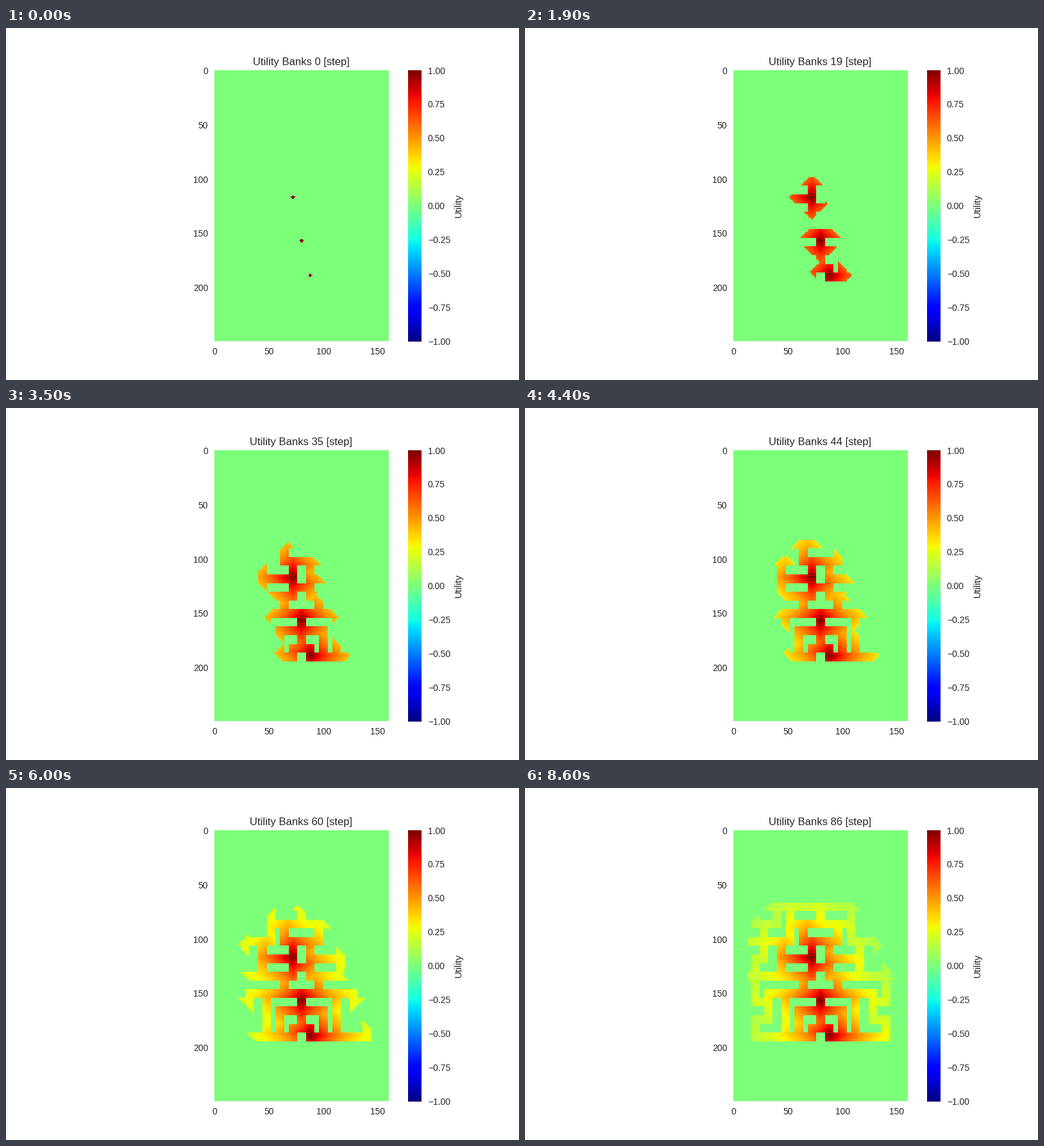
Recreate the animation shown at these times as a matplotlib script. Size 800 px wide and 550 px high, loop 8.7 s.

```python
import numpy as np
import matplotlib.pyplot as plt
from matplotlib.animation import FuncAnimation

W, H = 160, 250
LANE = 8          # corridor width in cells
TOP = 67          # first row of the maze
STEPS = 87
DECAY = 0.976
INK = "0.15"

plt.rcParams.update({
    "font.family": "Liberation Sans",
    "font.size": 10,
    "text.color": INK,
    "text.kerning_factor": 6,
    "axes.labelcolor": INK,
    "axes.facecolor": "#EAEAF2",
    "axes.edgecolor": "white",
    "axes.linewidth": 0,
    "axes.titlesize": 12,
    "axes.labelsize": 11,
})
for axis in ("xtick", "ytick"):
    plt.rcParams.update({f"{axis}.color": INK, f"{axis}.labelsize": 10,
                         f"{axis}.major.size": 0, f"{axis}.major.pad": 7})


def lane_top(k):
    return TOP + LANE * k


def carve(maze, x, k, *turns):
    """Dig a corridor from column x, lane k; turns go down/up, then sideways, ..."""
    for i, turn in enumerate(turns):
        nx, nk = (turn, k) if i % 2 else (x, turn)
        maze[lane_top(min(k, nk)):lane_top(max(k, nk) + 1),
             min(x, nx):max(x, nx) + LANE] = True
        x, k = nx, nk


def build_maze():
    """Carve the left half, then mirror it."""
    maze = np.zeros((H, W), bool)
    mid, inner = 76, 68
    # outer wall walk, from the roof down to the ground street
    carve(maze, 36, 0, 2, 16, 0, mid)
    carve(maze, 24, 2, 6, 16, 11, 28, 13, 16, 15, inner, 14, mid)
    # upper floors
    carve(maze, mid, 0, 2, 48, 0)
    carve(maze, 48, 2, 4, 13)
    carve(maze, 60, 2, 4, mid)
    # middle floors
    carve(maze, inner, 4, 8, 13)
    carve(maze, inner, 7, 7, mid)
    carve(maze, 40, 4, 6, inner)
    carve(maze, 40, 6, 8)
    carve(maze, 60, 8, 10)
    # lower floors
    carve(maze, 28, 11, 10, mid)
    carve(maze, 44, 10, 15)
    carve(maze, 56, 15, 12, mid)
    carve(maze, mid, 10, 14)
    return maze | maze[:, ::-1]


def walk_distance(maze):
    """Steps from the nearest bank, walking through the maze."""
    dist = np.full((H, W), np.inf)
    seen = np.zeros((H, W), bool)
    for i, lane in enumerate((6, 11, 15)):
        x = 71 + LANE * i
        seen[lane_top(lane) + 2, x:x + 2] = True
    dist[seen] = 0
    for d in range(1, STEPS + 1):
        grown = seen.copy()
        grown[1:] |= seen[:-1]
        grown[:-1] |= seen[1:]
        grown[:, 1:] |= seen[:, :-1]
        grown[:, :-1] |= seen[:, 1:]
        grown &= maze
        dist[grown & ~seen] = d
        seen = grown
    return dist


dist = walk_distance(build_maze())
utility = DECAY ** dist


def field(step):
    return np.where(dist <= step + 1, utility, 0.0)


fig, ax = plt.subplots(figsize=(8, 5.5), dpi=100)
img = ax.imshow(field(0), cmap="jet", vmin=-1, vmax=1, interpolation="nearest")
ax.set_xticks(range(0, W, 50))
ax.set_yticks(range(0, H, 50))
bar = fig.colorbar(img, ax=ax, ticks=np.linspace(-1, 1, 9))
bar.set_label("Utility")
title = ax.set_title("")


def update(step):
    img.set_data(field(step))
    title.set_text(f"Utility Banks {step} [step]")
    return img, title


anim = FuncAnimation(fig, update, frames=STEPS, interval=100,
                     repeat=True, repeat_delay=0, blit=False)
plt.show()
```
